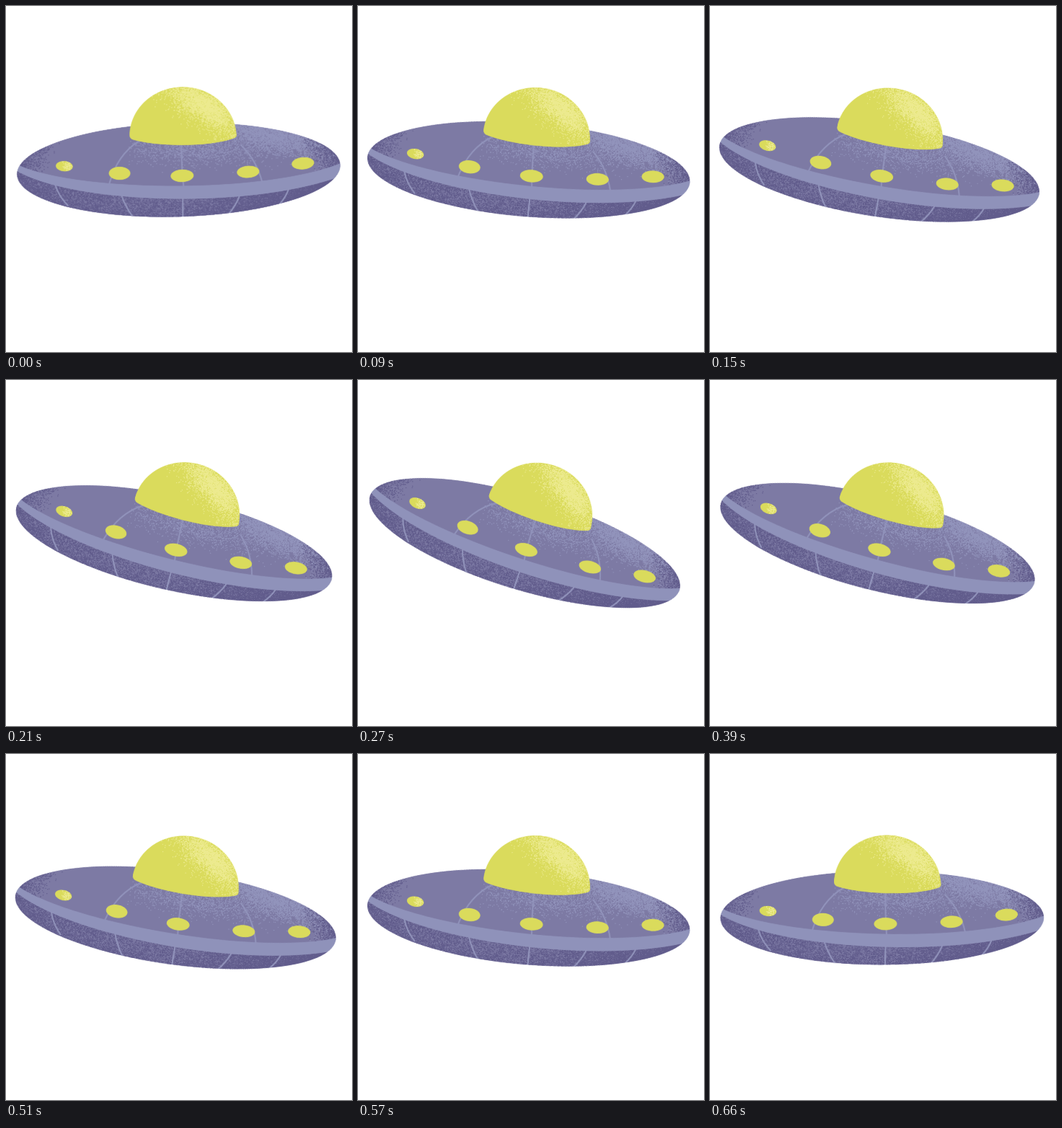
Write an HTML page with a canvas that moves like this. It is 480 px wide and 480 px high and loops after 0.69 s.

```html
<!DOCTYPE html>
<html lang="en">
<head>
<meta charset="utf-8">
<title>Saucer</title>
<style>
  html, body { margin: 0; width: 100%; height: 100%; overflow: hidden; background: #fff; }
  canvas { display: block; width: 480px; height: 480px; }
</style>
</head>
<body>
<canvas id="stage" width="480" height="480"></canvas>
<script>
const SIZE = 480, DETAIL = 2;
const LOOP = 690, STEP = 30, STEPS = 23, PEAK_STEP = 10, PEAK = 20.6;
const PIVOT = { x: 238.5, y: 201.3 };
const SHIFT = { x: 0.4, y: 0.3 };
const HULL = { x: 239.1, y: 226.9, rx: 224.4, ry: 65.2, tilt: -1.7 * Math.PI / 180 };
const C = {
  top: '#7d7aa4', belly: '#7a77a2', dark: '#615c8c', band: '#8f92ba',
  seam: '#9193bb', yellow: '#dadb5c', glow: '#ecea8e'
};

let seed = 7;
function random() {
  seed = (seed * 1664525 + 1013904223) % 4294967296;
  return seed / 4294967296;
}
const clamp = v => Math.max(0, Math.min(1, v));

// Soft elliptical spot: 1 in the middle, fading outwards
function spot(x, y, cx, cy, rx, ry, deg = 0) {
  const a = deg * Math.PI / 180, dx = x - cx, dy = y - cy;
  const u = (dx * Math.cos(a) + dy * Math.sin(a)) / rx;
  const v = (dy * Math.cos(a) - dx * Math.sin(a)) / ry;
  return Math.exp(-u * u - v * v);
}

// 0 at the hull centre, 1 on its rim
function rim(x, y) {
  const c = Math.cos(HULL.tilt), s = Math.sin(HULL.tilt);
  const dx = x - HULL.x, dy = y - HULL.y;
  return Math.hypot((dx * c + dy * s) / HULL.rx, (dy * c - dx * s) / HULL.ry);
}

function grain(g, clip, color, x0, y0, x1, y1, density) {
  g.save();
  g.clip(clip);
  g.fillStyle = color;
  for (let y = y0; y < y1; y++) {
    for (let x = x0; x < x1; x++) {
      if (random() < density(x, y)) g.fillRect(x, y, 1.2, 1.2);
    }
  }
  g.restore();
}

function fill(g, color, path) {
  g.fillStyle = color;
  g.fill(path);
}

function ellipse(x, y, rx, ry, tilt) {
  const path = new Path2D();
  path.ellipse(x, y, rx, ry, tilt, 0, 2 * Math.PI);
  return path;
}

function paintSaucer() {
  const sheet = document.createElement('canvas');
  sheet.width = sheet.height = SIZE * DETAIL;
  const g = sheet.getContext('2d');
  g.scale(DETAIL, DETAIL);

  const hull = ellipse(HULL.x, HULL.y, HULL.rx, HULL.ry, HULL.tilt);
  const belly = new Path2D('M12 227 C90 275 340 283 466 235 V310 H12 Z');
  const band = new Path2D('M12 218 C90 258 360 262 468 216 L466 235 C340 283 90 275 12 227 Z');
  const seams = new Path2D(
    'M184 187 Q154 206 143 246 M243 190 Q243 225 246 250 M325 192 Q347 213 355 244' +
    'M68 248 Q73 264 86 277 M160 263 Q166 280 177 294 M245 266 V294' +
    'M324 262 Q319 276 308 289 M392 253 Q388 265 378 276');
  const dome = new Path2D(
    'M171 179 C172 141 205 112 245 112 C285 112 317 142 319.5 178' +
    'Q320 182 315 183.5 C280 196 208 195 175 185 Q171 183 171 179 Z');

  g.save();
  g.clip(hull);
  fill(g, C.top, hull);
  grain(g, hull, C.seam, 170, 158, 464, 245, (x, y) => clamp(
    0.9 * spot(x, y, 365, 178, 75, 18, 12) + 0.4 * spot(x, y, 265, 200, 75, 14)));
  grain(g, hull, C.dark, 12, 163, 466, 250, (x, y) => {
    const edge = clamp((rim(x, y) - 0.82) * 4);
    return edge * clamp(Math.max((75 - x) / 55, (x - 405) / 50));
  });

  fill(g, C.belly, belly);
  grain(g, belly, C.dark, 12, 225, 466, 296, (x, y) => clamp(
    0.5 + 0.3 * clamp((x - 250) / 110) + 0.5 * clamp((rim(x, y) - 0.88) * 4)
    - 0.15 * spot(x, y, 240, 270, 90, 14)));

  fill(g, C.band, band);
  g.strokeStyle = C.seam;
  g.lineWidth = 2;
  g.stroke(seams);
  g.restore();

  const lights = [
    [80.5, 222, 11.8, 7.1, 4], [157.2, 231.8, 15, 9.1, 0], [244, 235.2, 16, 8.7, -2],
    [335.5, 229.8, 15.6, 8.4, -4], [411.5, 218, 15.6, 8.4, -5]
  ].map(([x, y, rx, ry, deg]) => ellipse(x, y, rx, ry, deg * Math.PI / 180));
  for (const light of lights) fill(g, C.yellow, light);
  grain(g, lights[0], C.glow, 78, 214, 93, 230, (x, y) => 0.7 * spot(x, y, 85, 221, 6, 6));

  fill(g, C.yellow, dome);
  grain(g, dome, C.glow, 200, 112, 322, 192, (x, y) => clamp(
    0.8 * spot(x, y, 263, 131, 38, 18, 30) + 0.5 * spot(x, y, 294, 153, 30, 18, 55)));
  return sheet;
}

const saucer = paintSaucer();
const ctx = document.getElementById('stage').getContext('2d');
ctx.imageSmoothingQuality = 'high';

// Steady swing down to the right, then a slower steady return
function angleAt(ms) {
  const n = Math.floor((ms % LOOP) / STEP);
  return n <= PEAK_STEP
    ? PEAK * n / PEAK_STEP
    : PEAK * (STEPS - n) / (STEPS - PEAK_STEP);
}

function draw(ms) {
  ctx.fillStyle = '#fff';
  ctx.fillRect(0, 0, SIZE, SIZE);
  ctx.save();
  ctx.translate(PIVOT.x + SHIFT.x, PIVOT.y + SHIFT.y);
  ctx.rotate(angleAt(ms) * Math.PI / 180);
  ctx.drawImage(saucer, -PIVOT.x, -PIVOT.y, SIZE, SIZE);
  ctx.restore();
}

const start = performance.now();
function tick() {
  draw(performance.now() - start);
  requestAnimationFrame(tick);
}
tick();
</script>
</body>
</html>
```
